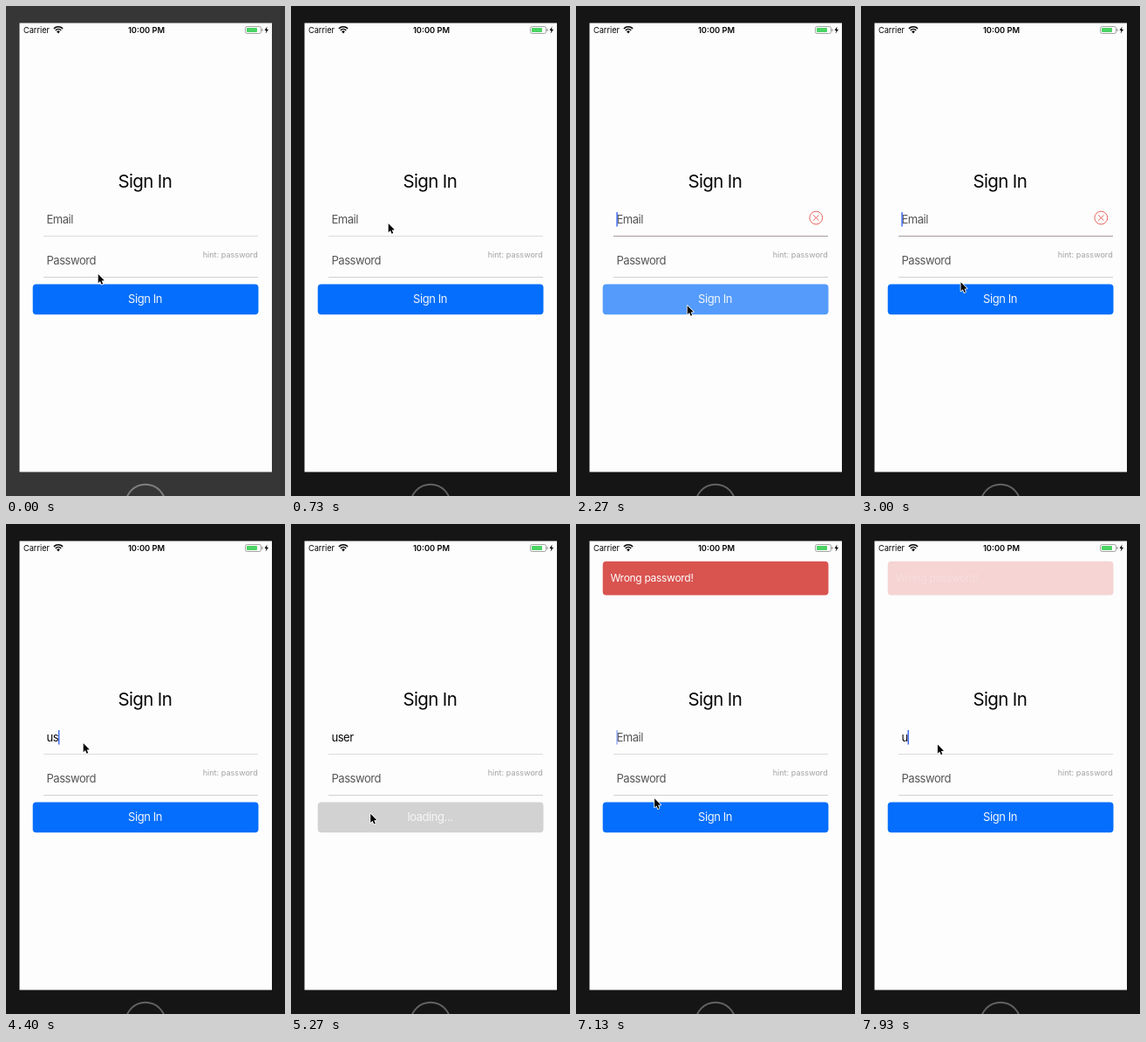
Write an HTML page with a canvas that moves like this. It is 320x561 px and loops after 8 s.

```html
<!DOCTYPE html>
<html lang="en">
<head>
<meta charset="utf-8">
<title>Sign In</title>
<style>
  html, body { margin: 0; width: 100%; height: 100%; overflow: hidden; background: #151515; }
  canvas { display: block; width: 320px; height: 561px; }
</style>
</head>
<body>
<canvas id="stage"></canvas>
<script>
const W = 320, H = 561, LOOP = 8000;
const canvas = document.getElementById('stage');
const ctx = canvas.getContext('2d');
const ratio = window.devicePixelRatio || 1;
canvas.width = Math.round(W * ratio);
canvas.height = Math.round(H * ratio);

const FONT = 'Inter, "Open Sans", sans-serif';
const INK = '#060606';
const FOCUS = 1270, ERROR = 2200, LOADING = 5220, REPLY = 6200;

// Pointer stops: time, x, y
const POINTER = [
  [70, 105.7, 307], [330, 111.7, 249], [1400, 111.7, 249], [2000, 127.7, 343],
  [2500, 127.7, 343], [2870, 122.7, 337], [3280, 88.7, 251], [4830, 88.7, 251],
  [5130, 91.5, 332], [5500, 90.7, 331.3], [6930, 90.7, 331.3], [7600, 87.9, 252.5]
];

// Email value and the moment its caret blink starts from
const TYPING = [
  [0, '', 880], [4270, 'u', 4270], [4360, 'us', 4360],
  [4730, 'use', 4670], [4830, 'user', 4670],
  [REPLY, '', REPLY], [7800, 'u', 7800]
];

const clamp = v => Math.max(0, Math.min(1, v));
const ramp = (t, a, b) => clamp((t - a) / (b - a));
const smooth = v => v * v * (3 - 2 * v);

function pointerAt(t) {
  let from = POINTER[0];
  for (const to of POINTER) {
    if (t < to[0]) {
      const k = smooth(ramp(t, from[0], to[0]));
      return [from[1] + (to[1] - from[1]) * k, from[2] + (to[2] - from[2]) * k];
    }
    from = to;
  }
  return [from[1], from[2]];
}

function blink(age) {
  const p = age % 1000;
  return p < 700 ? 1 - ramp(p, 400, 550) : ramp(p, 850, 1000);
}

function text(str, x, y, size, color, { weight = 400, gap = 0, align = 'left' } = {}) {
  ctx.font = `${weight} ${size}px ${FONT}`;
  ctx.letterSpacing = gap + 'px';
  ctx.textAlign = align;
  ctx.fillStyle = color;
  ctx.fillText(str, x, y);
  return ctx.measureText(str).width;
}

function box(x, y, w, h, r, color) {
  ctx.fillStyle = color;
  ctx.beginPath();
  ctx.roundRect(x, y, w, h, r);
  ctx.fill();
}

function shape(points, x, y) {
  ctx.beginPath();
  points.forEach(([px, py]) => ctx.lineTo(x + px, y + py));
  ctx.closePath();
}

function ring(x, y, r, color, width) {
  ctx.strokeStyle = color;
  ctx.lineWidth = width;
  ctx.beginPath();
  ctx.arc(x, y, r, 0, Math.PI * 2);
  ctx.stroke();
}

function drawPhone(t) {
  const lit = t < 530;
  ctx.fillStyle = lit ? '#363636' : '#151515';
  ctx.fillRect(0, 0, W, H);
  ring(160, 570.5, 22.8, lit ? '#808080' : '#626262', 2);
  ctx.fillStyle = '#fdfdfd';
  ctx.fillRect(15.5, 19.5, 289.5, 514);
}

function drawStatus() {
  text('Carrier', 20, 31, 9.2, INK);
  text('10:00 PM', 161, 31, 9.3, INK, { weight: 600, align: 'center' });

  ctx.strokeStyle = INK;
  ctx.lineWidth = 1.6;
  for (const r of [4.5, 7.2]) {
    ctx.beginPath();
    ctx.arc(60, 31, r, -Math.PI * 0.75, -Math.PI * 0.25);
    ctx.stroke();
  }
  ctx.fillStyle = INK;
  ctx.beginPath();
  ctx.moveTo(60, 31.4);
  ctx.arc(60, 31, 2.6, -Math.PI * 0.75, -Math.PI * 0.25);
  ctx.fill();

  ctx.strokeStyle = '#999';
  ctx.lineWidth = 0.9;
  ctx.beginPath();
  ctx.roundRect(274.5, 23.5, 18, 8, 2);
  ctx.stroke();
  box(276, 25, 12, 5, 0.8, '#4cd464');
  box(293.4, 26, 1.2, 3, 0.6, '#999');
  ctx.fillStyle = INK;
  shape([[3, 0], [0, 4.5], [2, 4.5], [1.2, 8], [4.6, 3.3], [2.5, 3.3]], 296.5, 23.5);
  ctx.fill();
}

function drawFields(t) {
  const [, value, origin] = TYPING.filter(step => step[0] <= t).pop();
  const bad = t >= ERROR && t < 4270;
  const input = { gap: -0.47 };
  const muted = '#555';

  text('Sign In', 159.3, 208, 20.5, INK, { gap: -0.65, align: 'center' });

  let width = 0;
  if (value) width = text(value, 46.5, 249, 13, INK, input);
  else text('Email', 46.5, 249, 13, muted, input);

  if (t >= FOCUS) {
    ctx.globalAlpha = blink(t - origin);
    ctx.fillStyle = '#426bf2';
    ctx.fillRect(46.3 + width, 236, 1.5, 16.5);
    ctx.globalAlpha = 1;
  }

  text('Password', 46.5, 296, 13, muted, input);
  text('hint: password', 288.7, 288, 9.1, '#a2a2a2', { align: 'right' });
  ctx.fillStyle = bad ? '#a69c9c' : '#dcdae0';
  ctx.fillRect(43, 263, 246, 1);
  ctx.fillStyle = '#d2cfd6';
  ctx.fillRect(43, 310, 246, 1);

  if (bad) {
    ring(275.3, 242.5, 7.4, '#e5625c', 1);
    ctx.beginPath();
    for (const s of [-1, 1]) {
      ctx.moveTo(275.3 - 3.2, 242.5 - 3.2 * s);
      ctx.lineTo(275.3 + 3.2, 242.5 + 3.2 * s);
    }
    ctx.stroke();
  }
}

function drawButton(t) {
  const busy = t >= LOADING && t < REPLY;
  const dip = ramp(t, 2070, 2150) - ramp(t, 2150, 2470);
  const tap = t < LOADING ? ramp(t, 5130, LOADING) : 0;
  ctx.globalAlpha = 1 - 0.52 * Math.max(dip, tap);
  box(30.7, 318.5, 258.8, 34.7, 4, busy ? '#d2d2d2' : '#056efc');
  ctx.globalAlpha = 1;
  const label = busy ? 'loading...' : 'Sign In';
  text(label, 159.5, 340, 13, busy ? '#f6f6f6' : '#f2f6fc', { gap: -0.42, align: 'center' });
}

function drawToast(t) {
  const alpha = ramp(t, 6280, 6480) - ramp(t, 7780, 7980);
  if (alpha <= 0) return;
  ctx.globalAlpha = alpha;
  box(30.7, 42.7, 258.8, 38.8, 4, '#d9534f');
  text('Wrong password!', 39.5, 66, 12, '#fff', { gap: -0.3 });
  ctx.globalAlpha = 1;
}

function drawPointer(t) {
  const [x, y] = pointerAt(t);
  shape([[0, 0], [0, 10.2], [2.3, 8.1], [3.9, 11.8], [5.5, 11.1], [4, 7.5], [7.1, 7.3]], x, y);
  ctx.lineJoin = 'round';
  ctx.strokeStyle = '#fff';
  ctx.lineWidth = 1.6;
  ctx.stroke();
  ctx.fillStyle = INK;
  ctx.fill();
}

function frame(now) {
  const t = now % LOOP;
  ctx.setTransform(ratio, 0, 0, ratio, 0, 0);
  drawPhone(t);
  drawStatus();
  drawFields(t);
  drawButton(t);
  drawToast(t);
  drawPointer(t);
}

const start = performance.now();
function tick() {
  frame(performance.now() - start);
  requestAnimationFrame(tick);
}
tick();
</script>
</body>
</html>
```
